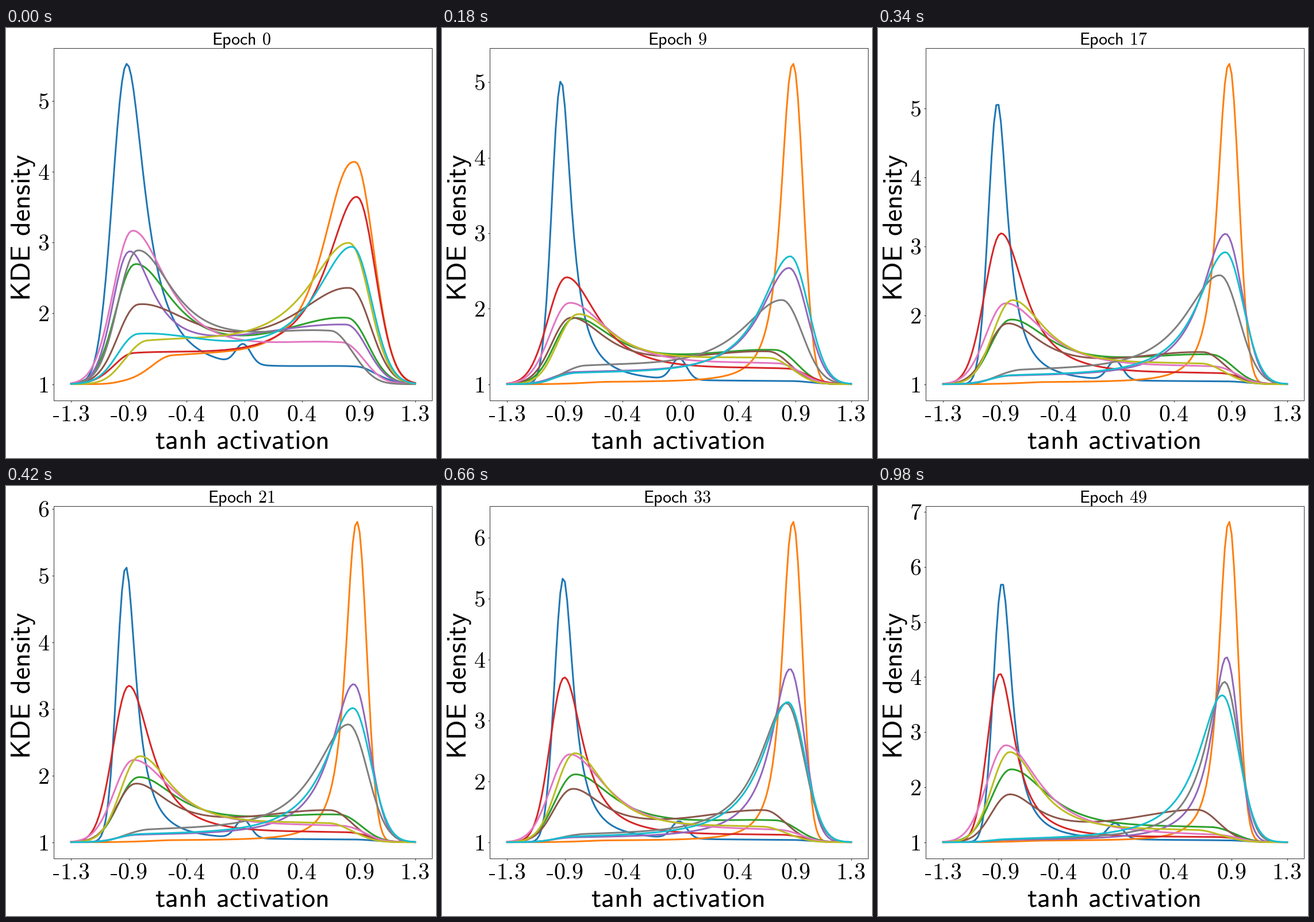
Recreate the animation shown at these times as a matplotlib script. Size 748 px wide and 748 px high, loop 1000 ms.

```python
import numpy as np
import matplotlib.pyplot as plt
from matplotlib.animation import FuncAnimation
from matplotlib.patches import Rectangle

SIZE, DPI = 748, 88
PT = 72 / DPI  # points per pixel
LEFT, RIGHT, TOP, BOTTOM = 83.5, 741.5, 34.5, 647.5
CENTRE = (LEFT + RIGHT) / 2
BASE, RISE = 619.6, 557.2  # pixel row of density 1, height of the tallest peak
EPOCHS, EARLY = 50, 9
KEY_PEAKS = 4.534, 4.25, 5.824  # tallest density at the start, after EARLY epochs, at the end

plt.rcParams["mathtext.fontset"] = "cm"

margin = (RIGHT - LEFT) / 22
grid = np.linspace(LEFT + margin, RIGHT - margin, 150)


def bump(peak, height, width, side, power):
    """Peak with a Gaussian outer flank and a long tail towards the far edge."""
    inward = side * (grid - peak)
    d = np.maximum(inward, 0)
    far_edge = (1 - np.tanh((side * (grid - CENTRE) - 222) / 22)) / 2
    tail = far_edge / (1 + (d / width) ** power)
    flank = np.exp(-(inward / (36 * np.tanh(width / 47))) ** 2 / 2)
    return height * np.where(inward > 0, tail, flank)


def density_curve(start, early, end, pace, power=2, spike=0):
    """Each state is (peak, height, width) of the left and then the right bump, in pixels."""
    keys = np.array([start, early, end], float)
    keys[:, [1, 4]] *= np.array(KEY_PEAKS)[:, None] / RISE
    centre_spike = spike * np.exp(-((grid - CENTRE) / 13) ** 2 / 2)
    rows = []
    for epoch in range(EPOCHS):
        if epoch <= EARLY:
            a, b, f = keys[0], keys[1], np.log1p(epoch) / np.log1p(EARLY)
        else:
            a, b, f = keys[1], keys[2], ((epoch - EARLY) / (EPOCHS - 1 - EARLY)) ** pace
        state = a + (b - a) * f
        rows.append(bump(*state[:3], 1, power) + bump(*state[3:], -1, power) + centre_spike)
    return rows


densities = np.stack([
    density_curve((210, 550, 39, 610, 26, 250),  # blue
                  (207, 526, 22, 610, 4, 250),
                  (215.8, 451, 21, 610, 2, 250), 1.49, spike=0.28),
    density_curve((290, 42, 250, 608, 372, 66),  # orange
                  (290, 3, 300, 611, 555, 24.5),
                  (290, 2, 300, 611, 556, 21), 0.85, power=2.4),
    density_curve((224, 189, 85, 594, 106, 180),  # green
                  (230, 100, 85, 580, 54, 220),
                  (231, 120, 82, 580, 20, 250), 1.26),
    density_curve((222, 46, 300, 611, 310, 66),  # red
                  (216, 178, 68, 600, 22, 300),
                  (212, 291, 32, 590, 7, 250), 0.47),
    density_curve((213, 196, 52, 592, 100, 300),  # purple
                  (230, 16, 300, 604, 196, 62),
                  (230, 2, 300, 606, 321, 31), 0.65),
    density_curve((230, 122, 130, 599, 154, 130),  # brown
                  (223, 102, 78, 568, 52, 210),
                  (228, 72, 60, 556, 54, 170), 1),
    density_curve((219, 248, 78, 585, 62, 250),  # pink
                  (221, 131, 88, 585, 29, 280),
                  (222, 166, 73, 585, 7, 280), 1.22),
    density_curve((228, 204, 80, 565, 82, 250),  # gray
                  (250, 24, 250, 592, 138, 88),
                  (250, 2, 250, 603, 278, 41), 0.84),
    density_curve((246, 62, 300, 598, 220, 92),  # olive
                  (236, 104, 80, 570, 40, 300),
                  (229, 151, 62, 555, 16, 250), 0.55),
    density_curve((230, 78, 200, 603, 222, 80),  # cyan
                  (235, 14, 250, 606, 218, 62),
                  (230, 1, 300, 599, 255, 51), 0.93),
], axis=1)  # epoch, curve, sample

fig = plt.figure(figsize=(SIZE / DPI, SIZE / DPI), dpi=DPI, facecolor="white")
ax = fig.add_axes([0, 0, 1, 1])
ax.set(xlim=(0, SIZE), ylim=(SIZE, 0))
ax.axis("off")


def sans(text):
    return r"$\mathsf{%s}$" % text.replace(" ", r"\hspace{0.38}")


def label(x, y, text, size, ha="center", **style):
    return ax.text(x, y, sans(text), fontsize=size * PT, ha=ha, va="baseline",
                   color="black", **style)


def tick(x, y):
    return ax.plot(x, y, color="black", lw=0.8 * PT, solid_capstyle="butt")[0]


lines = [ax.plot(grid, np.full_like(grid, BASE), color=f"C{i}", lw=3 * PT, zorder=2)[0]
         for i in range(densities.shape[1])]
ax.add_patch(Rectangle((LEFT, TOP), RIGHT - LEFT, BOTTOM - TOP, fill=False,
                       ec="black", lw=0.8 * PT, zorder=3))

for i in (*range(0, 149, 25), 149):
    x, value = grid[i], -1.3 + 2.6 * i / 149
    tick([x, x], [BOTTOM, BOTTOM + 3.5])
    negative = value < -0.05
    label(x - (19.9 if negative else 26.6), 684.5, f"{abs(value):.1f}", 40, ha="left")
    if negative:
        ax.add_patch(Rectangle((x - 31.5, 674.5), 10.4, 2.6, color="black", lw=0))

y_ticks = [(n, tick([LEFT - 3.5, LEFT], [BASE, BASE]),
            label(55.5, BASE, str(n), 40, ha="left")) for n in range(1, 8)]

title = label(409.3, 28.5, "Epoch 0", 30)
label(410.3, 731, "tanh activation", 48.3)
label(42, 347.5, "KDE density", 48.3, rotation=90, rotation_mode="anchor")


def draw(epoch):
    scale = RISE / densities[epoch].max()
    for line, density in zip(lines, densities[epoch]):
        line.set_ydata(BASE - scale * density)
    for n, mark, text in y_ticks:
        y = BASE - scale * (n - 1)
        mark.set_ydata([y, y])
        text.set_y(y + 13.9)
        for artist in (mark, text):
            artist.set_visible(y >= TOP)
    title.set_text(sans(f"Epoch {epoch}"))
    return lines


anim = FuncAnimation(fig, draw, frames=EPOCHS, interval=20, repeat=True)
plt.show()
```
